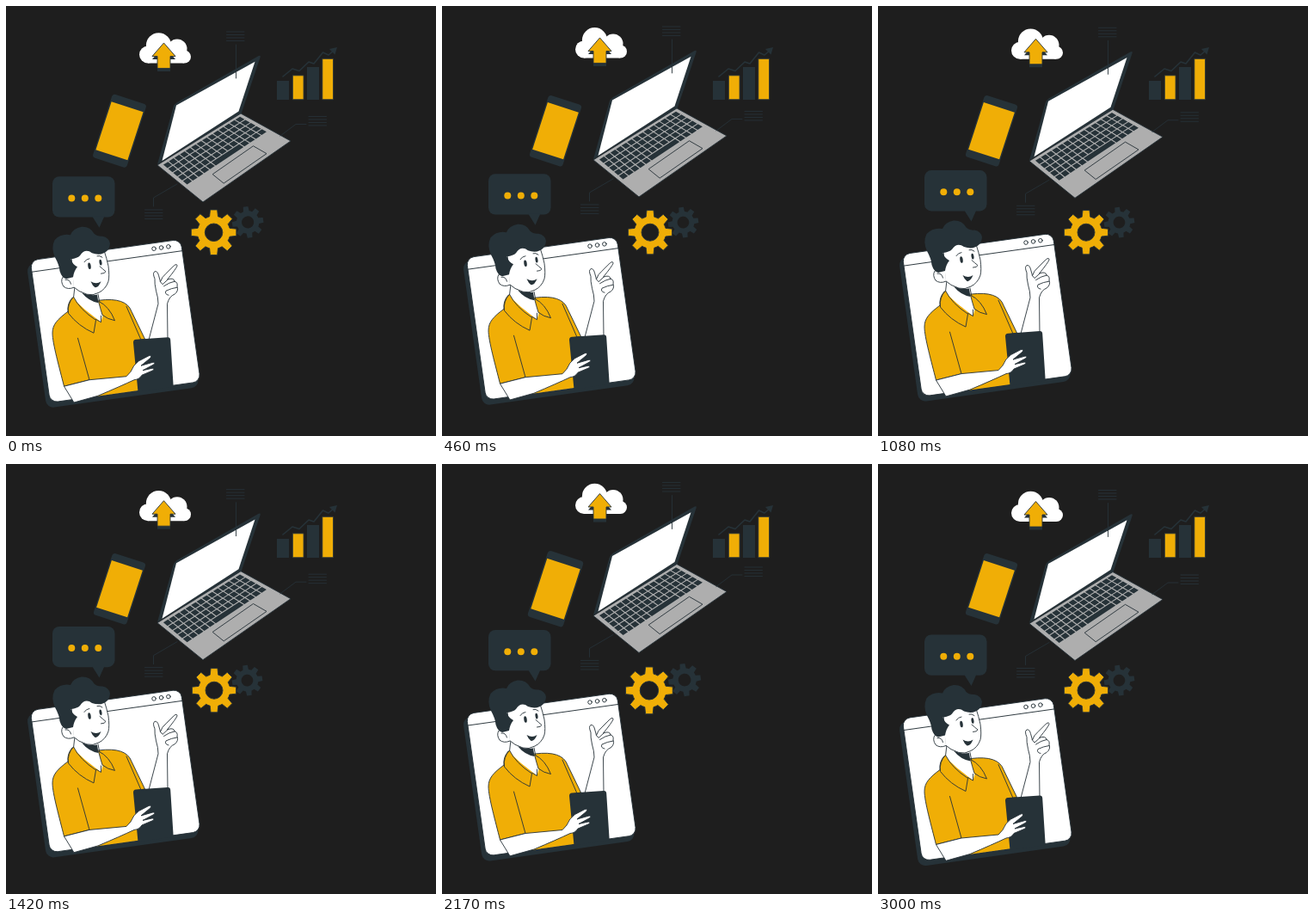
These frames come from a looping animation (500x500 px, 3.04 s). An HTML page:

```html
<!DOCTYPE html>
<html lang="en">
<head>
<meta charset="utf-8">
<title>Floating devices</title>
<style>
html, body { margin: 0; width: 100%; height: 100%; overflow: hidden; background: #1e1e1e }
svg { display: block; width: 100%; height: 100% }
.d { fill: #263238 }
.y { fill: #f0ae06 }
.w { fill: #fff }
.l { fill: none; stroke: #263238; stroke-width: .9; stroke-linecap: round; stroke-linejoin: round }
.o { stroke: #263238; stroke-width: .9; stroke-linejoin: round }
</style>
</head>
<body>
<svg viewBox="0 0 500 500">
  <defs>
    <path id="gear" fill-rule="evenodd"/>
    <path id="lines" class="l" d="M0 .5h20.5M0 4h20.5M0 7.5h20.5M0 11h20.5"/>
    <path id="arrow" d="M183.5 43L197 58.5H191V72.5H176V58.5H170Z"/>
    <clipPath id="above"><path d="M0 200H300V426.3L0 468.3Z"/></clipPath>
  </defs>

  <!-- chart -->
  <path class="d" d="M315 87h14v22h-14zM350 71h14v38h-14zM385 48l-9 2 6.5 6.5z"/>
  <path class="y o" d="M333.3 80.8h12.8v28h-12.8zM367.8 61.3h12.8v47.5h-12.8z"/>
  <path class="l" style="stroke-width:1.6" d="M322 82L333 73L341 75.5L352 65L358 67L368.5 54L375 57L382 51"/>

  <!-- cloud -->
  <g class="fast">
    <g class="w">
      <circle cx="177.5" cy="45.8" r="14.6"/>
      <circle cx="165" cy="56.5" r="10"/>
      <circle cx="199" cy="50" r="11.5"/>
      <circle cx="207.5" cy="59" r="7.5"/>
      <path d="M165 50h42v16.5h-42z"/>
    </g>
    <use href="#arrow" y="3.5" class="d"/>
    <use href="#arrow" class="y o"/>
  </g>

  <!-- laptop -->
  <g class="fast">
    <path class="d" d="M176 184L194.5 118Q195.5 114 199 112L292 59Q297 56 295.5 60L273.5 125.5Z"/>
    <path class="w" d="M198 115.5L289.5 64.8L270.5 122.5L181.5 180Z"/>
    <path class="o" fill="#aeaeae" d="M176 185L273 125L331 157L229 228Z"/>
    <path class="d" id="keys"/>
    <path class="l" d="M240.5 195.5L287.5 162.8L303 171.7L253.5 206Z"/>
    <path class="l" d="M267.5 45V84M349 137.5H337L319 151M171.5 233V223L199 207"/>
    <use href="#lines" x="256.5" y="29.5"/>
    <use href="#lines" x="352" y="128"/>
    <use href="#lines" x="161.5" y="236.5"/>
  </g>

  <!-- phone -->
  <g class="beat" data-at="132 145">
    <g transform="translate(132 145.2) rotate(18)">
      <rect class="d" x="-20.3" y="-37.7" width="40.6" height="75.4" rx="3.5"/>
      <rect class="y" x="-18.9" y="-28.7" width="37.8" height="57.4"/>
    </g>
  </g>

  <!-- gears -->
  <g class="beat" data-at="257.7 261">
    <use href="#gear" class="d" transform="translate(280.5 251.7) rotate(-8) scale(.69)"/>
    <use href="#gear" class="y o" transform="translate(242 263.2)"/>
  </g>

  <!-- presenter -->
  <g id="slow">
    <rect class="d" x="54" y="198" width="72.5" height="47.3" rx="8"/>
    <path class="d" d="M100 244L108.5 257.5L114.5 244Z"/>
    <g class="y">
      <circle cx="76.3" cy="223.2" r="4"/><circle cx="91.8" cy="223.2" r="4"/><circle cx="107.3" cy="223.2" r="4"/>
    </g>

    <g transform="translate(127.5 366) rotate(-8)">
      <rect class="d" x="-93.5" y="-79.5" width="179" height="169" rx="9"/>
      <rect class="w o" x="-88.6" y="-83.5" width="176.6" height="167" rx="9"/>
      <path class="l" d="M-88.6 -70H88"/>
      <g class="l"><circle cx="55.8" cy="-77" r="2.3"/><circle cx="64.4" cy="-77" r="2.3"/><circle cx="72.8" cy="-77" r="2.3"/></g>
    </g>

    <!-- pointing arm -->
    <path class="w o" d="M166 388L177 346Q177 339 174.5 331Q172.5 322 173 317Q170 310 173 308.5Q176 307.5 177.5 313L179.5 320.5Q181 315 186 311L195.5 301.5Q199 299 199 302Q198 305 187.5 318Q195 315 196 320Q200 321 199 326Q201 331 196 335Q190 337 187.5 346L188 388"/>
    <path class="l" d="M179.5 320.5L182 323.5L188 318M196 320Q190 321 183.5 325.5M199 327Q192 328 186 331Q184 335 189 336"/>

    <!-- shirt -->
    <g clip-path="url(#above)">
      <path class="y o" d="M77 339Q71 346 72 355C60 364 54 370 54 380C54 392 62 420 67.5 442L97 434.5L107 460L156 452L150 389L161.5 387L146 355Q140 338 108 342Z"/>
    </g>
    <path class="l" d="M83.5 386L97 434.5M140 349L157 388"/>

    <!-- neck and collar -->
    <path class="w" d="M80 322L78 340L92 353L110.5 367.5L113 358L107 342V328Z"/>
    <path class="l" d="M80 326L78.5 339M107 335L109 345"/>
    <path class="d" d="M88 333Q97 337 106 335.5L107.5 345Q96 343 88 333Z"/>
    <path class="y o" d="M78.5 338Q71 346 72.5 357Q84 372 102 380L104.5 365Q86 353 78.5 338Z"/>
    <path class="l" d="M104.5 364L110.5 367.5V360"/>
    <path class="y o" d="M107.5 343Q120 349 126.5 365.5Q118 364 112 359Q109.5 351 107.5 343Z"/>

    <!-- head -->
    <path class="w o" d="M76 290Q94 274 114 284Q117 293 119 302Q120.5 314 119 320Q116 329 108 333Q101 337 94 335Q84 332 78 326Z"/>
    <path class="w o" d="M78 314Q70 311 66 315Q63 320 67 326Q72 330 79 327"/>
    <path class="l" d="M69 318Q74 317 75.5 323"/>
    <path class="d" d="M121 276Q120 269 112 267.5Q106 268 102.5 264.5Q98 256 88 256.5Q78 258 75 266Q64 264 56.5 272Q52 281 57 292Q62 301 62.5 308Q65 316 70 317L78 315Q79 308 83 303Q77 300 75.5 294Q83 293 86 290Q92 281 100 287Q111 291 118 284Q121 280 121 276Z"/>
    <ellipse class="d" cx="97" cy="302" rx="1.7" ry="3.8" transform="rotate(-8 97 302)"/>
    <ellipse class="d" cx="110" cy="298" rx="1.5" ry="3.4" transform="rotate(-8 110 298)"/>
    <path class="l" d="M91 297.5Q93 294 97 293.5M106 290.5Q109 289.5 112 292M109 302.5Q113 306 116 308.5Q115 311 110.5 311"/>
    <path class="d" d="M98.5 320Q105 324 110.5 320Q107.5 327.5 103.5 327Q100.500 325 98.5 320Z"/>

    <!-- tablet and holding arm -->
    <path class="d" d="M148 391Q148 387.8 151 387.6L188 385Q191 384.8 191.2 388L194.7 442.5L153.5 448.5Z"/>
    <path class="w o" d="M67.5 442L79 460.8L107 453Q133 442 149 434.5Q155 434 158 429L171 423.5Q173 421 170 421L159 423.5L172 416.5Q174 414 171 414L157 418L168 409Q170 405.5 166 406.5L154.5 412.5Q148 417 145 425L140 430.5L97 434.5Z"/>
  </g>
</svg>
<script>
const $ = s => [...document.querySelectorAll(s)];
const mix = (a, b, k) => a + (b - a) * k;

// Keyboard: rows and columns spread between four corners
const [A, B, C, D] = [[182, 184.5], [272, 128.2], [304, 146.3], [210.5, 208.3]];
const at = (u, v) => [0, 1].map(i => mix(mix(A[i], B[i], u), mix(D[i], C[i], u), v).toFixed(2)).join(' ');
const cols = 14, rows = 5, gap = .08;
const key = (r, c, n) => {
  const u = (c + gap) / cols, U = (c + n - gap) / cols, v = (r + gap) / rows, V = (r + 1 - gap) / rows;
  return `M${at(u, v)}L${at(U, v)}L${at(U, V)}L${at(u, V)}Z`;
};
let keys = '';
for (let r = 0; r < rows; r++)
  for (let c = 0; c < cols;) {
    const n = r == rows - 1 && c == 5 ? 5 : 1;
    keys += key(r, c, n);
    c += n;
  }
$('#keys')[0].setAttribute('d', keys);

// Gear: eight tapered teeth around a hole
const tooth = [[-4.8, -18], [-4, -25.6], [4, -25.6], [4.8, -18]];
const rim = Array.from({ length: 8 }, (_, i) => {
  const a = i * Math.PI / 4, c = Math.cos(a), s = Math.sin(a);
  return tooth.map(([x, y]) => `${(x * c - y * s).toFixed(2)} ${(x * s + y * c).toFixed(2)}`).join('L');
});
$('#gear')[0].setAttribute('d', `M${rim.join('A18.6 18.6 0 0 1 ')}ZM-10 0a10 10 0 0 0 20 0a10 10 0 0 0 -20 0Z`);

// Motion: linear bobbing and a double pulse
const bob = (t, period) => .5 - 10 * (1 - Math.abs(1 - 2 * (t % period / period)));
const beats = [[0, 1], [.1, 1.1], [.3, 1], [.4, 1], [.475, 1.1], [.6, 1], [1, 1]];
const pulse = p => {
  const i = beats.findIndex(b => b[0] > p);
  const [p0, s0] = beats[i - 1], [p1, s1] = beats[i];
  return mix(s0, s1, (p - p0) / (p1 - p0));
};
const LOOP = 3040, FRAMES = 73;
const fast = $('.fast'), slow = $('#slow')[0], beat = $('.beat');

function draw(now) {
  const step = Math.min(FRAMES - 1, Math.floor((now % LOOP + 5) * .024));
  const t = (step + 1) * 3000 / FRAMES;
  const s = pulse(t % 1500 / 1500);
  slow.setAttribute('transform', `translate(0 ${bob(t, 3000)})`);
  fast.forEach(e => e.setAttribute('transform', `translate(0 ${bob(t, 1500)})`));
  beat.forEach(e => {
    const [x, y] = e.dataset.at.split(' ');
    e.setAttribute('transform', `translate(${x} ${y}) scale(${s}) translate(${-x} ${-y})`);
  });
  requestAnimationFrame(draw);
}
draw(performance.now());
</script>
</body>
</html>
```
